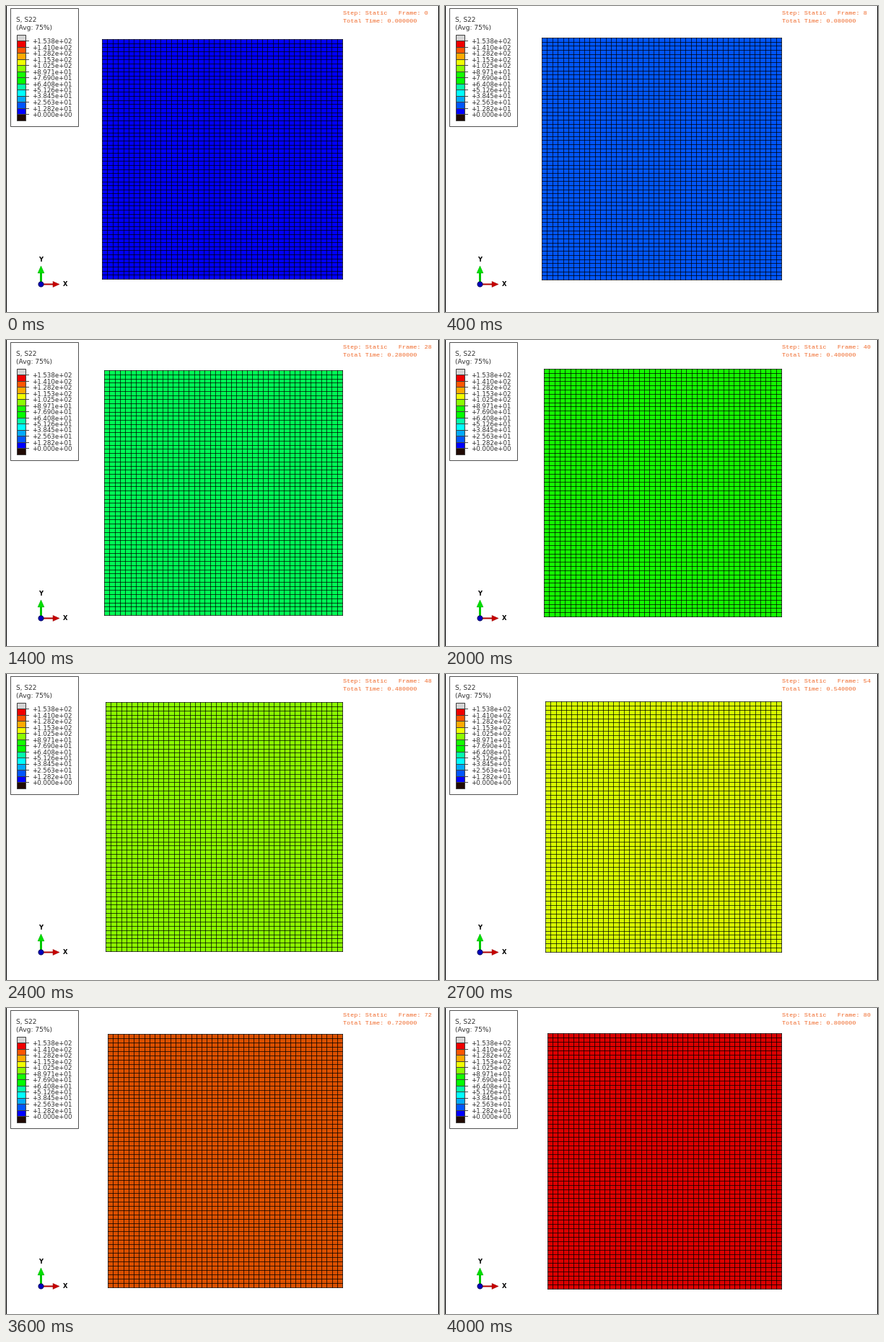
These frames come from a looping animation (600x425 px, 4100 ms). A matplotlib script:

```python
import math

import matplotlib.pyplot as plt
import numpy as np
from matplotlib.animation import FuncAnimation
from matplotlib.collections import LineCollection
from matplotlib.patches import Circle, Polygon, Rectangle

W, H, DPI = 600, 425, 100
STEPS, INTERVAL = 41, 100
COLS, ROWS = 45, 59
RIGHT = 466
PEAK = 153.792
PX = 72 / DPI  # one pixel in points

# Contour bands from low to high stress
BANDS = ["#0000ff", "#0055ff", "#00aaff", "#00ffff", "#00ffaa", "#00ff00",
         "#14ff00", "#8bff00", "#f0ff00", "#ffaa00", "#ff5500", "#f00000"]
# The shaded mesh shows a few bands in a different tone
MESH = dict(enumerate(BANDS))
MESH.update({4: "#00ff55", 5: "#00ff2e", 8: "#d8ff00", 9: "#d9a800",
             10: "#dc5000", 11: "#dc0000"})

fig = plt.figure(figsize=(W / DPI, H / DPI), dpi=DPI, facecolor="white")
ax = fig.add_axes([0, 0, 1, 1])
ax.set_xlim(0, W)
ax.set_ylim(H, 0)
ax.axis("off")


def box(x, y, w, h, fill="none", edge="none"):
    # Edges already lie on pixel centres, so snapping would shift them
    patch = Rectangle((x, y), w, h, facecolor=fill, edgecolor=edge,
                      linewidth=PX if edge != "none" else 0, snap=False)
    return ax.add_patch(patch)


def label(x, y, text, size, font="DejaVu Sans", color="#303030", **kw):
    return ax.text(x, y, text, fontsize=size * PX, family=font, color=color,
                   va="baseline", **kw)


def draw_legend():
    box(6.5, 3.5, 94, 164, "white", "#505050")
    label(14.5, 22, "S, S22", 9)
    label(14.5, 32.8, "(Avg: 75%)", 9.1)
    swatches = ["#d4d4d4"] + BANDS[::-1] + ["#200a04"]
    tops = [math.floor(40 + 8.5 * k) + 0.5 for k in range(len(swatches) + 1)]
    for color, top, end in zip(swatches, tops, tops[1:]):
        box(15.5, top, 12, end - top, color, "#404040")
    for k, y in enumerate(tops[1:-1]):
        ax.plot([28, 32], [y, y], color="#505050", lw=PX, snap=False,
                solid_capstyle="butt")
        value = PEAK * (12 - k) / 12
        label(36.5, 52 + 8.5 * k, f"{value:+.3e}", 8.6)


def draw_triad():
    x, y = 48.5, 386.5
    box(x - 1.5, 370, 3, 14, "#00c800")
    ax.add_patch(Polygon([(x - 4.5, 371), (x + 4.5, 371), (x, 361)],
                         facecolor="#00e000", edgecolor="#00a000", lw=0.3))
    box(52, y - 1, 13, 2, "#b00000")
    ax.add_patch(Polygon([(65, y - 4), (65, y + 4), (74, y)],
                         facecolor="#c80000", edgecolor="#900000", lw=0.3))
    ax.add_patch(Circle((x, y), 3.5, facecolor="#0000c0",
                        edgecolor="#000060", lw=PX))
    label(48, 355, "Y", 8.4, color="black", weight="bold", ha="center")
    label(82, 389.3, "X", 8.4, color="black", weight="bold", ha="center")


for edge in (0, W - 1):
    box(edge, 0, 1, H, "black")
draw_legend()
draw_triad()

plate = box(0, 0, 1, 1, BANDS[0])
grid = LineCollection([], colors=[(0, 0, 0, 0.72)], linewidths=PX,
                      capstyle="butt", snap=False)
ax.add_collection(grid)
status = dict(size=8.5, font="Liberation Mono", color="#f0692a")
step_text = label(467, 12.4, "", **status)
time_text = label(467, 23, "", **status)


def pixel_centres(start, end, count):
    return np.round(np.linspace(start, end, count + 1)) + 0.5


def update(i):
    # The plate stretches vertically and contracts from the left
    left = round(132.7 + 0.235 * i)
    top = round(45.6 - 0.275 * i)
    bottom = round(378.6 + 0.275 * i)
    xs = pixel_centres(left, RIGHT, COLS)
    ys = pixel_centres(top, bottom, ROWS)

    band = min(12 * i // (STEPS - 1), 11)
    plate.set_bounds(xs[0], ys[0], xs[-1] - xs[0], ys[-1] - ys[0])
    plate.set_facecolor(MESH[band])
    grid.set_segments(
        [[(x, ys[0] - 0.5), (x, ys[-1] + 0.5)] for x in xs]
        + [[(xs[0] - 0.5, y), (xs[-1] + 0.5, y)] for y in ys])

    step_text.set_text(f"Step: Static   Frame: {2 * i}")
    time_text.set_text(f"Total Time: {0.02 * i:.6f}")
    return plate, grid, step_text, time_text


anim = FuncAnimation(fig, update, frames=STEPS, interval=INTERVAL,
                     init_func=lambda: update(0), repeat=True, blit=False)
plt.show()
```
